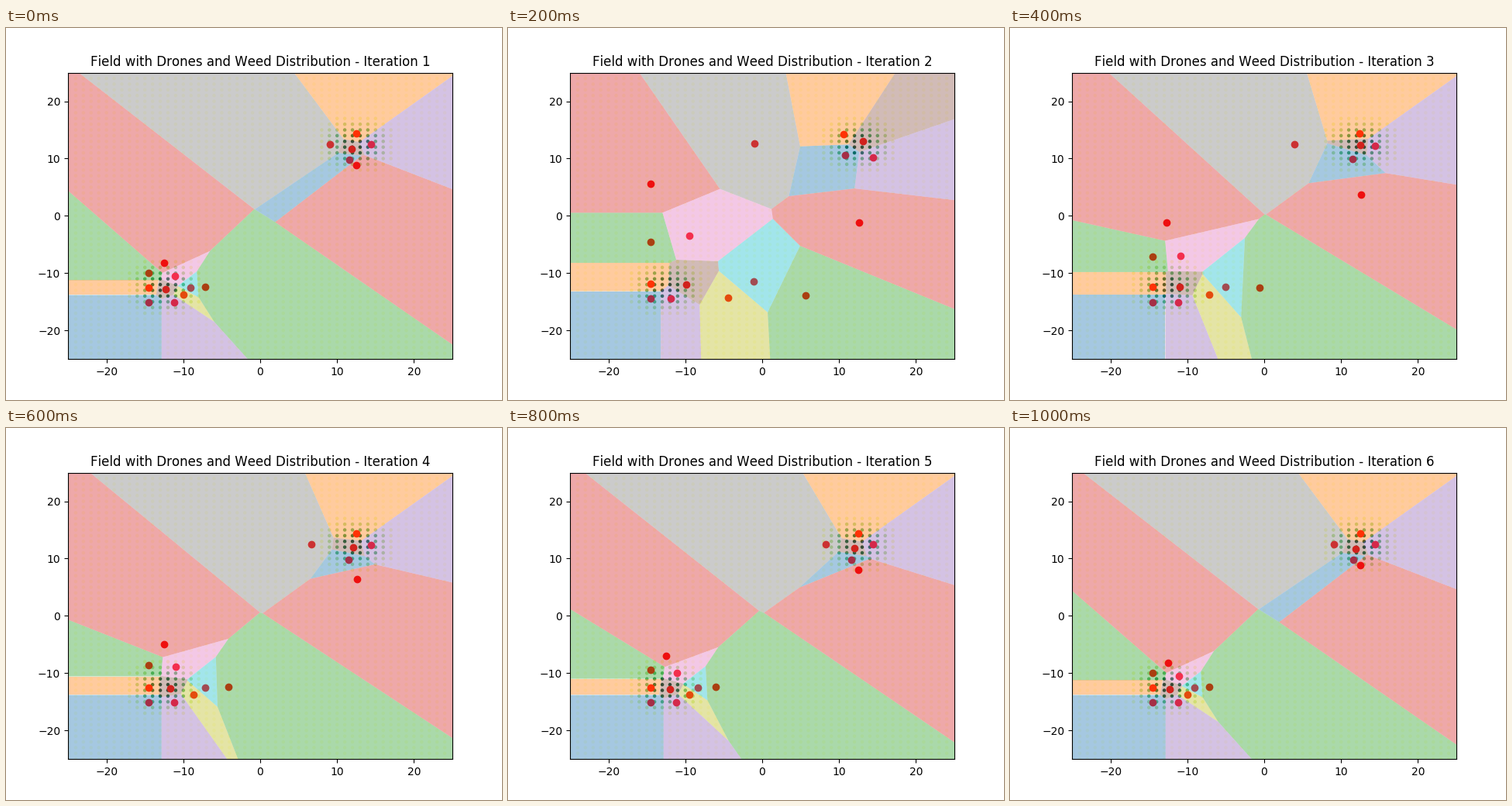
A matplotlib script that plays this animation: 640 px wide and 480 px high, repeating every 1.2 s.

```python
import numpy as np
import matplotlib.pyplot as plt
from matplotlib.animation import FuncAnimation

HALF = 25          # field spans -HALF..HALF on both axes
HOTSPOT = 12.5     # weed patches sit at (+-HOTSPOT, +-HOTSPOT)
SPREAD = 2.5
STEPS = 6
GLIDE, SNAP = 0.56, 0.1   # share of the way left after each step

# Where each drone starts and where it settles around its weed patch.
ROUTES = np.array([
    [(-14.5, -14.45), (-14.5, -15.1)],
    [(-14.5, -11.85), (-14.5, -12.52)],
    [(-14.5, -4.55), (-14.5, -9.91)],
    [(-14.5, 5.65), (-12.5, -8.2)],
    [(-11.9, -14.45), (-11.15, -15.1)],
    [(-9.85, -12), (-12.25, -12.85)],
    [(-9.45, -3.45), (-11.05, -10.55)],
    [(-1.05, 12.6), (9.1, 12.5)],
    [(-4.4, -14.3), (-9.95, -13.75)],
    [(-1.15, -11.45), (-9.05, -12.52)],
    [(10.75, 10.6), (11.55, 9.8)],
    [(10.55, 14.28), (12.55, 14.42)],
    [(5.6, -13.9), (-7.15, -12.42)],
    [(12.6, -1.15), (12.55, 8.83)],
    [(14.38, 10.25), (14.43, 12.45)],
    [(13.08, 13.05), (11.85, 11.7)],
])
START, REST = ROUTES[:, 0], ROUTES[:, 1]

# Long legs and the drones in the core of a patch glide, short legs snap.
reach = np.abs(np.abs(REST) - HOTSPOT).max(axis=1, keepdims=True)
PACE = np.where((np.abs(REST - START) > 2.3) | (reach < 1), GLIDE, SNAP)


def drones_at(step):
    # The first step shows the settled layout, the same as the last one.
    last = STEPS - 2
    k = (step - 1) % (last + 1)
    left = (PACE ** k - PACE ** last) / (1 - PACE ** last)
    return REST + (START - REST) * left


def clip(polygon, middle, normal):
    """Keep the part of a convex polygon behind the line through middle."""
    side = (polygon - middle) @ normal
    kept = []
    for i, p in enumerate(polygon):
        a, b = side[i - 1], side[i]
        if (a > 0) != (b > 0):
            q = polygon[i - 1]
            kept.append(q + (p - q) * a / (a - b))
        if b <= 0:
            kept.append(p)
    return np.array(kept)


def voronoi_cell(points, i):
    cell = 2.0 * HALF * np.array([[-1, -1], [1, -1], [1, 1], [-1, 1]])
    for j, other in enumerate(points):
        if j != i:
            cell = clip(cell, (points[i] + other) / 2, other - points[i])
    return cell


def weed_density(x, y):
    bump = sum(np.exp(-((x - c) ** 2 + (y - c) ** 2) / (2 * SPREAD ** 2))
               for c in (-HOTSPOT, HOTSPOT))
    return np.floor(10 * bump)


plt.rcParams["text.kerning_factor"] = 6
fig, ax = plt.subplots(figsize=(6.4, 4.8), dpi=100)
gx, gy = np.meshgrid(np.arange(-HALF, HALF), np.arange(-HALF, HALF))
ax.scatter(gx, gy, c=weed_density(gx, gy), cmap="YlGn", s=5)

# The translucent cells lie over the weeds and drones and tint them.
first = drones_at(0)
drones = ax.scatter(*first.T, color="red")
cells = [ax.fill(*voronoi_cell(first, i).T, color=f"C{i % 10}", alpha=0.4, lw=0)[0]
         for i in range(len(first))]
title = ax.set_title("")
ax.set_xlim(-HALF, HALF)
ax.set_ylim(-HALF, HALF)


def update(step):
    points = drones_at(step)
    drones.set_offsets(points)
    for i, cell in enumerate(cells):
        cell.set_xy(voronoi_cell(points, i))
    title.set_text(f"Field with Drones and Weed Distribution - Iteration {step + 1}")
    return [drones, title, *cells]


anim = FuncAnimation(fig, update, frames=STEPS, interval=200, repeat=True)
plt.show()
```
